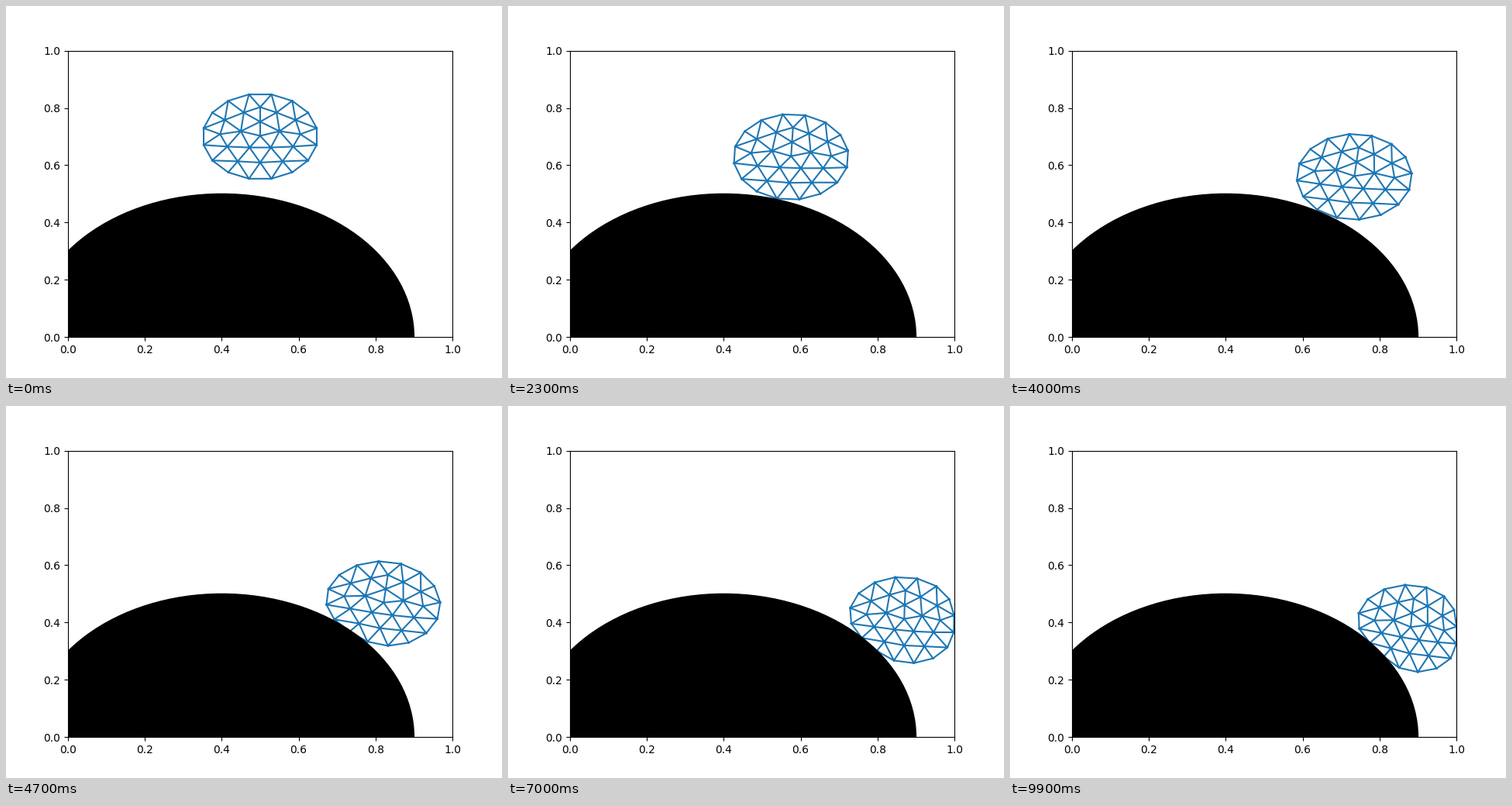
Write a matplotlib script that moves like this. It is 640 by 480 pixels and loops after 10 s.

```python
import numpy as np
import matplotlib.pyplot as plt
from matplotlib.animation import FuncAnimation
from matplotlib.tri import Triangulation

FRAMES, INTERVAL = 100, 100
RADIUS = 0.15
HILL, HILL_RADIUS = 0.4, 0.5  # the hill's centre lies on the x axis
WALL = 1.0
SOFTNESS, BULGE = 0.4, 0.25

# Falls, bounces and wall hits: step, centre x, centre y, clockwise turn.
KEYS = np.array([
    (0, 0.500, 0.700, 0), (6, 0.500, 0.654, 0), (11, 0.504, 0.612, 0),
    (19, 0.549, 0.645, 0.035), (23, 0.575, 0.629, 0.05),
    (29, 0.614, 0.579, 0.07), (32, 0.643, 0.579, 0.086),
    (36, 0.690, 0.586, 0.10), (41, 0.746, 0.5485, 0.115),
    (47, 0.821, 0.467, 0.142), (58, 0.887, 0.339, 0.15),
    (70, 0.8695, 0.410, 0.06), (78, 0.854, 0.454, 0.05),
    (85, 0.8734, 0.4175, 0.058), (92, 0.880, 0.383, 0.09),
    (99, 0.881, 0.3815, 0.121),
])
times, poses = KEYS[:, 0], KEYS[:, 1:]


def spline_slopes(t, p):
    """Slopes of a smooth cubic spline that starts at rest."""
    n = len(t)
    h = np.diff(t)
    d = np.diff(p, axis=0) / h[:, None]
    a, b = np.eye(n), np.zeros_like(p)
    for i in range(1, n - 1):
        a[i, i - 1:i + 2] = h[i], 2 * (h[i - 1] + h[i]), h[i - 1]
        b[i] = 3 * (h[i] * d[i - 1] + h[i - 1] * d[i])
    a[-1, -2:] = 1, 2
    b[-1] = 3 * d[-1]
    return np.linalg.solve(a, b)


slopes = spline_slopes(times, poses)


def pose(t):
    """Centre x, centre y and turn at step t."""
    i = min(np.searchsorted(times, t, side="right") - 1, len(times) - 2)
    h = times[i + 1] - times[i]
    s = (t - times[i]) / h
    return ((1 + 2 * s) * (1 - s)**2 * poses[i]
            + s * s * (3 - 2 * s) * poses[i + 1]
            + s * (1 - s) * h * ((1 - s) * slopes[i] - s * slopes[i + 1]))


def ring(count, radius, start=np.pi / 2):
    return radius * np.exp(1j * (start + 2 * np.pi * np.arange(count) / count))


def ball_mesh():
    """Unit disc of rings; inner nodes relax to their neighbours' mean."""
    rim = ring(16, 1, np.pi / 16)
    z = np.concatenate([rim, ring(12, 0.67) + 0.02j, ring(5, 0.345), [0]])
    edges = Triangulation(z.real, z.imag).edges
    links = np.zeros((len(z), len(z)))
    links[edges[:, 0], edges[:, 1]] = links[edges[:, 1], edges[:, 0]] = 1
    links /= links.sum(axis=1, keepdims=True)
    for _ in range(200):
        z[len(rim):] = (links @ z)[len(rim):]
    return z, edges


def press(z, normal, depth):
    """Dent of the unit disc where a surface pushes along its normal."""
    s = -z * np.conj(normal)
    dent = (s / (1 - s / 2)).real - 1j * BULGE * s.imag
    return SOFTNESS * max(depth, 0) * normal * dent


disc, edges = ball_mesh()


def nodes(t):
    x, y, turn = pose(t)
    center = x + 1j * y
    z = disc * np.exp(-1j * turn)
    gap = center - HILL
    dist = abs(gap)
    return (center + RADIUS * z
            + press(z, gap / dist, HILL_RADIUS + RADIUS - dist)
            + press(z, -1, x + RADIUS - WALL))


def wire(z):
    """Edges as one line with breaks between them."""
    seg = np.full((len(edges), 3, 2), np.nan)
    seg[:, :2, 0] = z.real[edges]
    seg[:, :2, 1] = z.imag[edges]
    return seg.reshape(-1, 2).T


fig, ax = plt.subplots(figsize=(6.4, 4.8), dpi=100)
ax.set(xlim=(0, 1), ylim=(0, 1))
ax.add_patch(plt.Circle((HILL, 0), HILL_RADIUS, color="black", zorder=2.2))
mesh, = ax.plot(*wire(nodes(0)), color="C0", lw=1.5)


def update(frame):
    mesh.set_data(*wire(nodes(frame)))
    return mesh,


anim = FuncAnimation(fig, update, frames=FRAMES, interval=INTERVAL,
                     repeat=True, repeat_delay=0)
plt.show()
```
